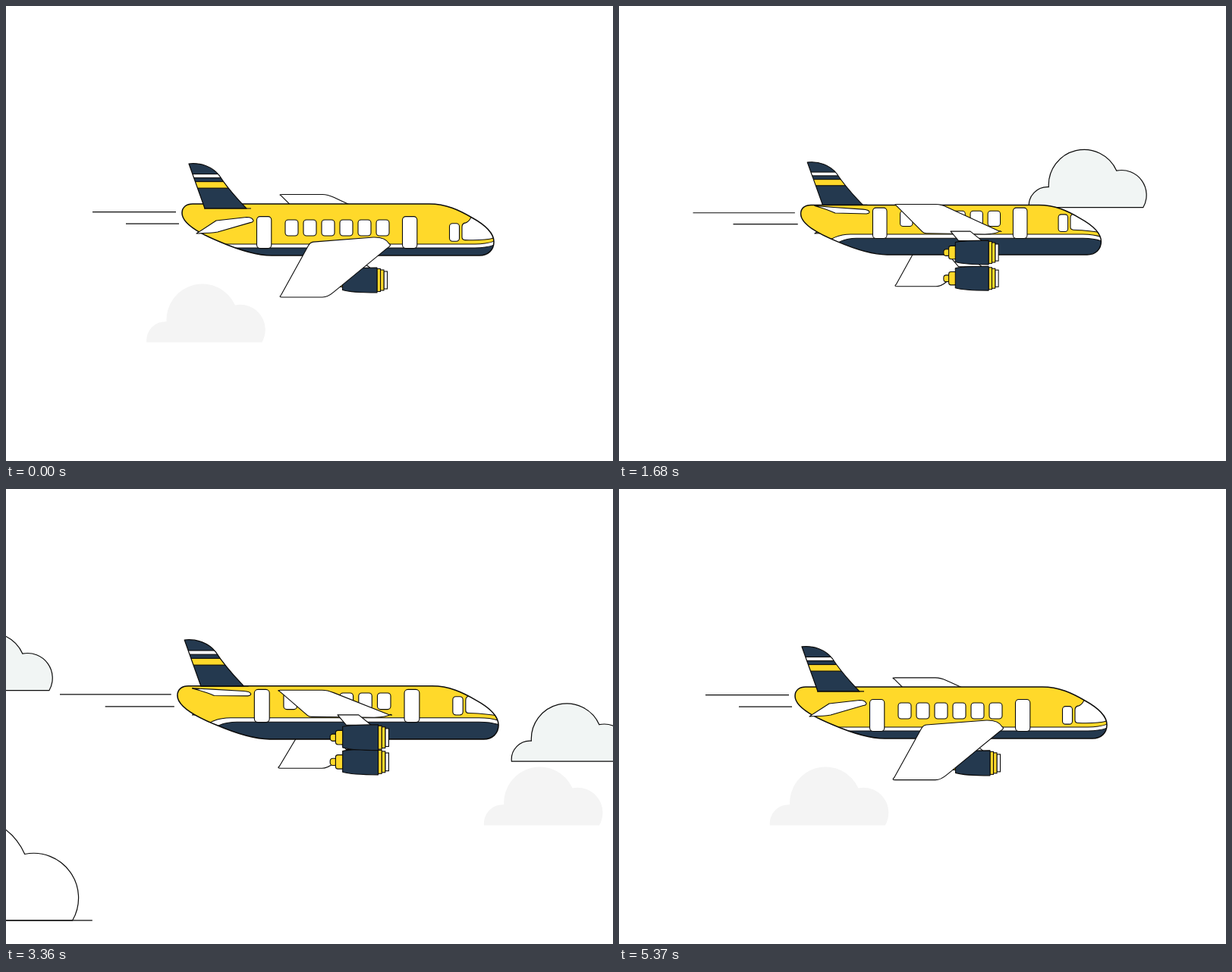
An HTML page that plays this animation: 800 by 600 pixels, repeating every 5.4 s.

```html
<!DOCTYPE html>
<html lang="en">
<head>
<meta charset="utf-8">
<title>Plane</title>
<style>
  html, body { margin: 0; width: 100%; height: 100%; overflow: hidden; background: #fff; }
  svg { display: block; width: 100vw; height: 100vh; }
</style>
</head>
<body>
<svg id="stage" viewBox="0 0 800 600"></svg>
<script>
const LOOP = 5400, YELLOW = '#ffd92a', NAVY = '#24394f', WHITE = '#fff', INK = '#0b0b0b';
const CENTER = { x: 437.5, y: 300 };
const stage = document.getElementById('stage');

// Each track is a list of [time, value], eased between neighbours.
const ROLL = [[0, 1], [540, .13], [930, .58], [1680, -1], [2340, .56], [3360, -.9], [3960, .47], [4560, -.8], [5400, 1]];
const ZOOM = [[0, 1], [1170, 1], [2400, .9], [3400, 1.03], [4320, 1], [5400, 1]];
const TRAIL_A = [[0, 323.5], [300, 374], [930, 335.5], [1680, 353], [2340, 364], [3360, 356], [3960, 351.5], [4300, 370], [5400, 323.5]];
const TRAIL_B = [[0, 279.5], [300, 312], [930, 296.5], [1680, 298], [2340, 307], [3360, 298], [3960, 303], [4300, 310], [5400, 279.5]];

function sample(track, t) {
  const i = track.findIndex(key => key[0] > t);
  const [t0, v0] = track[i - 1], [t1, v1] = track[i];
  return v0 + (v1 - v0) * (1 - Math.cos(Math.PI * (t - t0) / (t1 - t0))) / 2;
}

const shape = (d, fill, width = 1.1) =>
  `<path d="${d}" fill="${fill}" stroke="${INK}" stroke-width="${width}" stroke-linejoin="round"/>`;
const box = (x, y, w, h, fill, rx = 0) =>
  `<rect x="${x}" y="${y}" width="${w}" height="${h}" rx="${rx}" fill="${fill}" stroke="${INK}" stroke-width="1.1"/>`;
const line = (x1, x2, y, width = 1.2) =>
  `<path d="M${x1} ${y}H${x2}" stroke="${INK}" stroke-width="${width}"/>`;

const CLOUD = 'M.5 0A24.5 24.5 0 0 1 26.5 -27A46.8 46.8 0 0 1 116 -48.5A32.8 32.8 0 0 1 151 0Z';
const HULL = 'M246 261H558C580 261 597 269 614 279C634 290 643 301 643 311C643 322 635 329 624 329H350' +
  'C328 329 303 320 282 311C256 300.5 232 287 232 273C232 265 238 261 246 261Z';

function cloud(x, y, scale, fill, width, ground) {
  if (x > 830 || x < -400) return '';
  const stroke = width ? `stroke="${INK}" stroke-width="${width / scale}"` : '';
  const base = ground ? line(-5.2, 165.5, 0, width / scale) : '';
  return `<g transform="translate(${x} ${y}) scale(${scale})"><path d="${CLOUD}" fill="${fill}" ${stroke}/>${base}</g>`;
}

function clouds(t) {
  const grey = t < 2500 ? 185 - .215 * t : 501 - .2145 * (t - 3960);
  const drift = (mid, x, speed, bend) => {
    const s = (t - mid) / 1000;
    return Math.abs(s) > 1.6 ? -999 : x - speed * s + bend * s ** 3;
  };
  const lag = 2263;
  const small = start => cloud(17.5 - 1.2 * (t - start), 568.8, 1.8, WHITE, 1.2, true);
  const large = start => cloud(26 - 1.4 * (t - start), 564.7, 2.16, WHITE, 1.4, true);
  return cloud(grey, 443.5, 1.01, '#f4f4f4') +
    cloud(drift(2130, 356.8, 413.9, 31.41), 265.7, 1, '#f1f5f4', 1.2) +
    cloud(drift(4060, 328, 520, 75), 359.2, 1, '#f1f5f4', 1.2) +
    small(930) + large(2340) + small(930 + lag) + large(2340 + lag);
}

function wing(r) {
  const tip = 322 + 62 * r, back = 305.8 + 5.7 * r, mid = 303 + 2 * r, front = 307 + 8.5 * r;
  const near = (a, b, k) => a + (b - a) * k;
  return shape(`M${near(361, 401, .04)} ${near(tip, back, .04)}L${near(361, 401, .94)} ${near(tip, back, .94)}` +
    `Q401 ${back} 405 ${back - .4}L484 ${mid}Q500 ${mid - .5} 505 ${front - 2}Q509 ${front} 502 ${near(front, tip, .06)}` +
    `L432 ${near(tip, front, .1)}Q424 ${tip} 417 ${tip}H364Q359 ${tip} ${near(361, 401, .04)} ${near(tip, back, .04)}Z`, WHITE);
}

function tailplane(r) {
  const root = 276.8 + 6.3 * r;
  return shape(`M251 ${281 + 19 * r}L277 ${273.6 + 9.4 * r}L317 ${272.7 + 5.8 * r}Q325 ${273 + 5.6 * r} 326 ${root}` +
    `Q326 ${root + 2} 322 ${root + 2.5}L279 ${285 + 13 * r}Q270 ${283.5 + 16 * r} 251 ${281 + 19 * r}Z`, WHITE);
}

function engine(y) {
  return `<g transform="translate(0 ${y})">` +
    shape('M437 -29H464L480 -16H448Z', WHITE) +
    box(427.5, -4.5, 9, 9, YELLOW, 3.5) + box(434.5, -9, 11, 18, YELLOW, 3) +
    box(498, -11.5, 4.5, 23, WHITE) + box(493.5, -13.5, 4.5, 27, YELLOW) + box(489, -15, 4.5, 30, YELLOW) +
    shape('M443.5 -14Q455 -16.5 489 -16.5V16.5Q455 16.5 443.5 13Z', NAVY) + '</g>';
}

function band(top, r, fill) {
  const bend = 16 * Math.max(0, -r);
  const left = fill === NAVY ? 270 : 262;
  return shape(`M${left} ${top + bend}Q${left + 15} ${top} ${left + 38} ${top}H618Q634 ${top} 645 ${top - 4.5 * r}V340H${left}Z`, fill);
}

function fuselage(r) {
  const shift = 6.4 * r;
  let side = '';
  for (let i = 0; i < 6; i++) side += box(368 + 24 * i, 275.6 + shift, 17, 21, WHITE, 4);
  for (const x of [330.5, 522.5]) side += box(x, 271.2 + shift, 19.3, 42, WHITE, 4.5);
  side += box(584.5, 280.3 + shift, 13, 23.5, WHITE, 4);
  const sill = 301.8 + 6.8 * r;
  const screen = `M601 ${285 + shift}Q601 ${280 + shift} 606 ${279.5 + shift}Q611 ${278 + shift} 615 ${268 + shift}` +
    `L660 260V${302.5 + 3.5 * r}H643Q630 ${sill + 1} 605 ${sill}Q601 ${sill} 601 ${sill - 4}Z`;
  return `<g clip-path="url(#hull)"><path d="${HULL}" fill="${YELLOW}"/>` +
    band(307.5 + 6.5 * r, r, WHITE) + band(312.7 + 6.3 * r, r, NAVY) +
    shape(screen, WHITE) + side + '</g>' + shape(HULL, 'none', 1.5);
}

function fin(r) {
  const tip = 196.5 + (r > 0 ? 11.5 : 6) * Math.abs(r);
  const base = 261 + 6 * Math.max(0, r);
  const y = v => tip + (base - tip) * v;
  const d = `M241 ${y(0)}C257 ${y(-.03)} 272 ${y(.07)} 281 ${y(.26)}C289 ${y(.47)} 301 ${y(.72)} 317 ${y(1)}H262Z`;
  const stripe = (a, b, fill) => box(230, y(a), 100, y(b) - y(a), fill);
  return `<clipPath id="fin"><path d="${d}"/></clipPath><path d="${d}" fill="${NAVY}"/>` +
    `<g clip-path="url(#fin)">${stripe(.23, .315, WHITE)}${stripe(.4, .545, YELLOW)}</g>` +
    shape(d, 'none', 1.2) + line(261, 323, base);
}

function plane(t) {
  const r = sample(ROLL, t), zoom = sample(ZOOM, t);
  const nearEngine = engine(339.15 + 17.75 * r + 4.6 * r * r);
  const farEngine = engine(331 - 27 * r + 3.5 * r * r);
  const nearWing = wing(r);
  const farWing = `<g transform="translate(0 -11.5)">${wing(-r)}</g>`;
  return `<g transform="translate(${CENTER.x} ${CENTER.y}) scale(${zoom}) translate(${-CENTER.x} ${-CENTER.y})">` +
    line(CENTER.x - sample(TRAIL_A, t), 224, 271.7) + line(CENTER.x - sample(TRAIL_B, t), 228, 287.2) +
    farWing + farEngine + tailplane(-r) +
    fuselage(r) + fin(r) + tailplane(r) +
    (r > 0 ? nearEngine + nearWing : nearWing + nearEngine) + '</g>';
}

function draw(t) {
  stage.innerHTML = `<clipPath id="hull"><path d="${HULL}"/></clipPath>` + clouds(t) + plane(t);
}

const start = performance.now();
function tick() {
  draw((performance.now() - start) % LOOP);
  requestAnimationFrame(tick);
}
tick();
</script>
</body>
</html>
```
